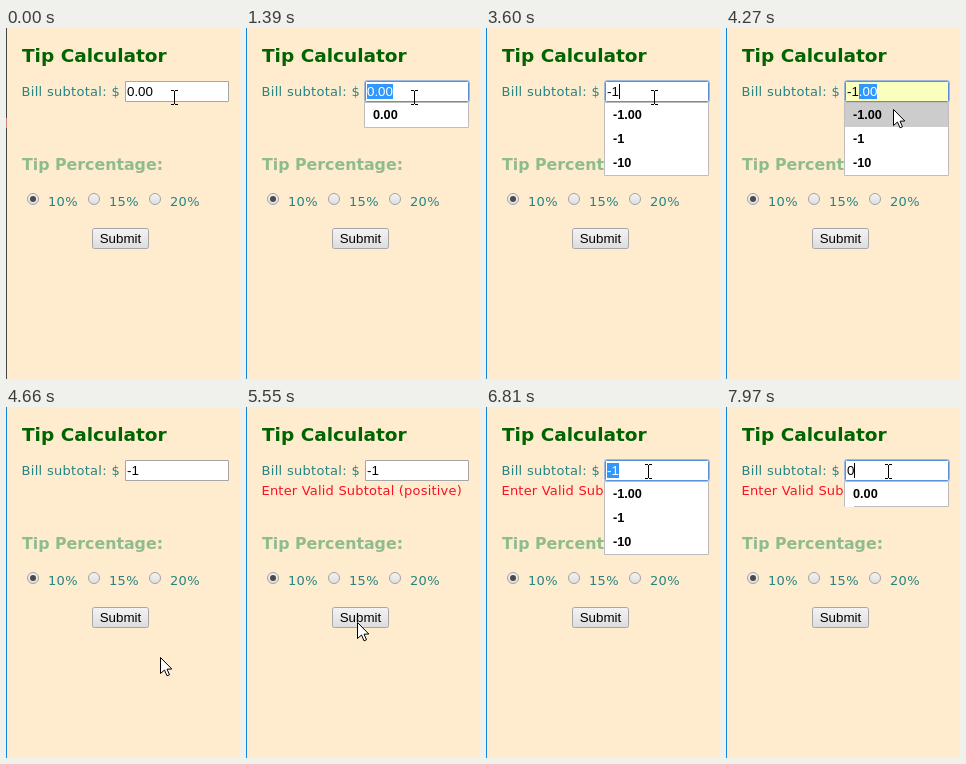
An HTML page with a canvas that plays this animation: 234 px wide and 351 px high, repeating every 8000 ms.

```html
<!DOCTYPE html>
<html lang="en">
<head>
<meta charset="utf-8">
<title>Tip Calculator</title>
<style>
html, body { margin: 0; width: 100%; height: 100%; overflow: hidden; background: #ffebcd; }
canvas { display: block; }
</style>
</head>
<body>
<canvas id="stage" width="234" height="351"></canvas>
<script>
const ctx = document.getElementById('stage').getContext('2d');
const LOOP = 8000;
const SANS = '"DejaVu Sans", sans-serif';
const UI = '"Liberation Sans", sans-serif';
const FIELD_FONT = `13.333px ${UI}`;
const NEGATIVES = ['-1.00', '-1', '-10'];

const arrow = (x, y) => ({ kind: 'arrow', x, y });
const beam = (x, y) => ({ kind: 'beam', x, y });

// Each step changes only the listed properties; sel is a [from, to] character range.
const steps = [
  [0, { active: false, focus: false, value: '0.00', sel: null, caret: false, fill: '#fff',
        list: null, blank: false, hot: -1, cut: 0, error: false, hover: false, cursor: beam(168, 62) }],
  [1000, { active: true }],
  [1120, { focus: true, caret: true }],
  [1260, { caret: false, sel: [0, 4], list: ['0.00'], blank: true }],
  [1390, { blank: false }],
  [2790, { value: '-', sel: null, caret: true, list: [...NEGATIVES, '-200'] }],
  [3330, { caret: false }],
  [3600, { value: '-1', caret: true, list: NEGATIVES }],
  [4150, { value: '-1.00', sel: [2, 5], caret: false, fill: '#faffbd', hot: 0, cursor: arrow(168, 78) }],
  [4270, { cursor: arrow(167, 81) }],
  [4390, { value: '-1', sel: null, fill: '#fff', hot: -1, cursor: arrow(168, 156) }],
  [4510, { cursor: arrow(162, 235) }],
  [4660, { focus: false, list: null, cursor: arrow(154, 250) }],
  [4810, { hover: true, cursor: arrow(116, 220) }],
  [4960, { cursor: arrow(111, 215) }],
  [5550, { error: true, hover: false }],
  [5830, { cursor: arrow(142, 130) }],
  [5950, { cursor: beam(162, 68) }],
  [6100, { cursor: beam(162, 57) }],
  [6230, { focus: true, caret: true }],
  [6370, { caret: false, sel: [1, 2], list: NEGATIVES }],
  [6810, { sel: [0, 2] }],
  [7820, { value: '0', sel: null, caret: true, list: ['0.00'], blank: true, cut: 104 }],
  [7970, { blank: false, cut: 9 }]
];

function stateAt(time) {
  const state = {};
  for (const [start, change] of steps) if (start <= time) Object.assign(state, change);
  return state;
}

function rect(x, y, w, h, color) {
  ctx.fillStyle = color;
  ctx.fillRect(x, y, w, h);
}

function frame(x, y, w, h, radius, color) {
  ctx.beginPath();
  ctx.roundRect(x + .5, y + .5, w - 1, h - 1, radius);
  ctx.lineWidth = 1;
  ctx.strokeStyle = color;
  ctx.stroke();
}

function text(str, x, y, font, color, spacing = 0) {
  ctx.font = font;
  ctx.letterSpacing = `${spacing}px`;
  ctx.fillStyle = color;
  ctx.fillText(str, x, y);
}

function shade(top, bottom, from, to) {
  const g = ctx.createLinearGradient(0, top, 0, bottom);
  g.addColorStop(0, from);
  g.addColorStop(1, to);
  return g;
}

function drawRadio(x, y, checked) {
  ctx.beginPath();
  ctx.arc(x, y, 5.5, 0, Math.PI * 2);
  ctx.fillStyle = shade(y - 6, y + 6, '#f4f4f4', '#dedede');
  ctx.fill();
  ctx.lineWidth = 1;
  ctx.strokeStyle = '#a3a3a3';
  ctx.stroke();
  if (!checked) return;
  ctx.beginPath();
  ctx.arc(x, y, 3, 0, Math.PI * 2);
  ctx.fillStyle = '#4a4a4a';
  ctx.fill();
}

function drawButton(hover) {
  ctx.beginPath();
  ctx.roundRect(86, 200, 57, 21, 2);
  ctx.fillStyle = hover ? shade(200, 221, '#fafafa', '#e4e4e4') : shade(200, 221, '#f4f4f4', '#dcdcdc');
  ctx.fill();
  frame(86, 200, 57, 21, 2, hover ? '#8c8c8c' : '#a6a6a6');
  text('Submit', 93.7, 215, FIELD_FONT, '#000');
}

function drawPage(s) {
  rect(0, 0, 234, 351, '#ffebcd');
  rect(0, 0, 1, 351, s.active ? '#1883d7' : '#444');
  if (!s.active) rect(0, 90, 1, 10, '#d98080');
  text('Tip Calculator', 16, 34, `bold 18.5px ${SANS}`, '#006400');
  text('Bill subtotal: $', 15.5, 68, `13px ${SANS}`, '#258484', .3);
  if (s.error) text('Enter Valid Subtotal (positive)', 15.5, 88, `13px ${SANS}`, '#fa1022', .2);
  text('Tip Percentage:', 16, 142, `bold 15.8px ${SANS}`, '#8fbc8f');
  ['10%', '15%', '20%'].forEach((label, i) => {
    drawRadio(27 + 61 * i, 171, i === 0);
    text(label, 42 + 61 * i, 178, `13px ${SANS}`, '#258484', .3);
  });
  drawButton(s.hover);
}

function drawField({ value, sel, caret, fill, focus }) {
  const left = 121;
  rect(119, 53, 104, 21, fill);
  if (focus) {
    frame(118, 52, 106, 23, 2, '#9db8df');
    frame(119, 53, 104, 21, 1, '#5a8fdc');
  } else {
    frame(119, 53, 104, 21, 0, '#a6a6a6');
  }
  text(value, left, 68, FIELD_FONT, '#000');
  const edge = n => left + Math.round(ctx.measureText(value.slice(0, n)).width);
  if (sel) {
    const [a, b] = sel.map(edge);
    rect(a, 56, b - a, 15, '#3297fd');
    text(value.slice(...sel), left + ctx.measureText(value.slice(0, sel[0])).width, 68, FIELD_FONT, '#fff');
  }
  if (caret) rect(edge(value.length), 56, 1, 15, '#000');
}

function drawList({ list, blank, hot, cut }) {
  const height = 24 * list.length + 2;
  rect(118, 74, 105, height, '#fff');
  frame(118, 74, 105, height, 0, '#bdbdbd');
  if (cut) rect(119, 73 + height, Math.min(cut, 103), 1, '#fff');
  list.forEach((item, i) => {
    if (i === hot) rect(119, 75, 103, 24, '#ccc');
    if (!blank) text(item, 127, 91 + 24 * i, `bold 12.7px ${UI}`, '#000');
  });
}

function drawCursor({ kind, x, y }) {
  if (kind === 'beam') {
    for (const edge of [y, y + 14]) {
      rect(x - 3, edge, 3, 1, '#000');
      rect(x + 1, edge, 3, 1, '#000');
    }
    rect(x, y + 1, 1, 13, '#000');
    return;
  }
  const points = [[0, 0], [0, 16], [4, 12.5], [6.5, 18.3], [9, 17.3], [6.5, 11.7], [11.3, 11.5]];
  ctx.beginPath();
  for (const [dx, dy] of points) ctx.lineTo(x + dx + .5, y + dy + .5);
  ctx.closePath();
  ctx.fillStyle = '#fff';
  ctx.fill();
  ctx.lineWidth = 1;
  ctx.strokeStyle = '#000';
  ctx.stroke();
}

function render(now) {
  const state = stateAt(now % LOOP);
  drawPage(state);
  drawField(state);
  if (state.list) drawList(state);
  drawCursor(state.cursor);
}

const origin = performance.now();
function tick() {
  render(performance.now() - origin);
  requestAnimationFrame(tick);
}
tick();
</script>
</body>
</html>
```
